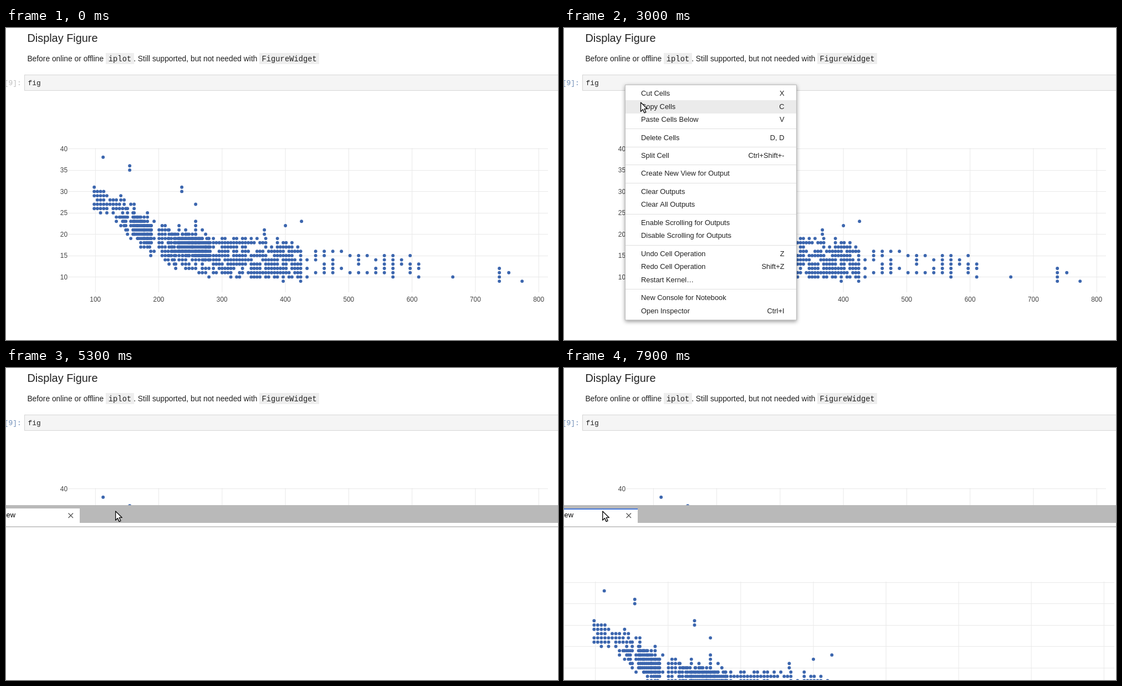
These frames come from a looping animation (996 by 562 pixels, 8000 ms). An HTML page with a canvas:

```html
<!DOCTYPE html>
<html lang="en">
<head>
<meta charset="utf-8">
<title>Display Figure</title>
<style>
  html, body { margin: 0; width: 100%; height: 100%; overflow: hidden; background: #fff; }
  canvas { display: block; width: 996px; height: 562px; }
</style>
</head>
<body>
<canvas id="stage" width="996" height="562"></canvas>
<script>
const ctx = document.getElementById('stage').getContext('2d');
const LOOP = 8000;
const SANS = '"Liberation Sans", Arial, sans-serif';
const MONO = '"Liberation Mono", monospace';
const INK = '#212121';

// ---------- drawing helpers ----------
function rect(x, y, w, h, color) {
  ctx.fillStyle = color;
  ctx.fillRect(x, y, w, h);
}
function text(str, x, y, size, color = INK, family = SANS, align = 'left') {
  ctx.font = `${size}px ${family}`;
  ctx.textAlign = align;
  ctx.fillStyle = color;
  ctx.fillText(str, x, y);
}

// ---------- scatter data, x in pixels of the main chart ----------
let seed = 11;
const random = () => (seed = (seed * 16807) % 2147483647) / 2147483647;
const trend = x => 12.5 + 16 / (1 + ((x - 150) / 100) ** 2);
const dots = [];

function column(x, low, high = low, keep = 1) {
  for (let v = Math.round(low); v <= Math.round(high); v++)
    if (random() < keep) dots.push([x, v]);
}
// Columns of dots that spread around the trend, each of a random height
function cloud({ from, to, step, spread, keep = 1, lift = 0 }) {
  const reach = () => spread * (.6 + .4 * random());
  for (let x = from; x <= to; x += step) {
    const middle = trend(x) + lift;
    column(x, middle - reach(), middle + reach(), keep);
  }
}
cloud({ from: 159, to: 216, step: 5.7, spread: 3.2, keep: .75 });
cloud({ from: 229, to: 262, step: 3, spread: 2.6 });
cloud({ from: 207, to: 268, step: 6, spread: 5, keep: .6 });
cloud({ from: 276, to: 306, step: 5.5, spread: 4.5, keep: .8 });
cloud({ from: 310, to: 368, step: 2.9, spread: 2.4, lift: 1 });
cloud({ from: 294, to: 366, step: 6, spread: 5.5, keep: .7 });
cloud({ from: 374, to: 532, step: 5.25, spread: 5, keep: .75 });
cloud({ from: 543, to: 754, step: 15.5, spread: 3, keep: .5 });

// Lone dots
column(175, 38);
column(223, 35, 36);
column(317, 30, 31);
column(342, 20, 23);
column(342, 27);
column(466, 20, 21);
column(504, 22);
column(533, 23);
column(806, 10);
column(890, 9, 12);
column(907, 11);
column(931, 9);

const valueY = (v, y0) => y0 + (40 - v) * 7.7;

// x0: position of 100, y0: position of 40, dx: width of 100 units
function chart({ x0, y0, dx, left, right, bottom }) {
  for (let v = 40; v >= 10; v -= 5)
    rect(left, Math.round(valueY(v, y0)), right - left, 1, '#e9e9e9');
  for (let i = 0; i < 8; i++)
    rect(x0 + i * dx, y0 - 1, 1, bottom - y0, '#e9e9e9');
  ctx.fillStyle = '#3c66ae';
  for (const [x, v] of dots) {
    ctx.beginPath();
    ctx.arc(x0 + .4 + (x - 161) * dx / 114.28, valueY(v, y0) + .4, 2.95, 0, 7);
    ctx.fill();
  }
}

const mainChart = { x0: 160.8, y0: 217, dx: 114.28, left: 112, right: 978, bottom: 477 };
const viewChart = { x0: 56.2, y0: 385.6, dx: 131.08, left: 1, right: 993, bottom: 640 };

function notebook(active) {
  text('Display Figure', 38.4, 25.3, 19.9);
  rect(180, 45, 51, 20, '#eee');
  rect(457, 45, 108, 20, '#eee');
  text('Before online or offline', 38.4, 60, 13.8);
  text('iplot', 184.8, 60, 13.8, INK, MONO);
  text('. Still supported, but not needed with', 230.2, 60, 13.8);
  text('FigureWidget', 461.5, 60, 13.8, INK, MONO);

  rect(33, 84, 970, 29, '#d5d5d5');
  rect(34, 85, 970, 27, '#f5f5f5');
  text('[9]:', -3.2, 103, 12.86, active ? '#6d8db8' : '#bdbdbd', MONO);
  text('fig', 39.5, 103, 12.86, INK, MONO);

  chart(mainChart);
  for (let v = 40; v >= 10; v -= 5)
    text(v, 111, valueY(v, 221.5), 11.87, '#444', SANS, 'right');
  for (let i = 0; i < 8; i++)
    text(100 + i * 100, 161.2 + i * mainChart.dx, 493.4, 11.87, '#444', SANS, 'center');
}

// ---------- context menu ----------
const menuGroups = [
  [['Cut Cells', 'X'], ['Copy Cells', 'C'], ['Paste Cells Below', 'V']],
  [['Delete Cells', 'D, D']],
  [['Split Cell', 'Ctrl+Shift+-']],
  [['Create New View for Output']],
  [['Clear Outputs'], ['Clear All Outputs']],
  [['Enable Scrolling for Outputs'], ['Disable Scrolling for Outputs']],
  [['Undo Cell Operation', 'Z'], ['Redo Cell Operation', 'Shift+Z'], ['Restart Kernel…']],
  [['New Console for Notebook'], ['Open Inspector', 'Ctrl+I']]
];

function menu(pointerY) {
  ctx.save();
  ctx.shadowColor = 'rgba(0,0,0,.4)';
  ctx.shadowBlur = 7;
  ctx.shadowOffsetY = 2;
  rect(110, 102, 310, 424.5, '#bdbdbd');
  ctx.restore();
  rect(111, 103, 308, 422.5, '#fff');
  let y = 117.8;
  menuGroups.forEach((group, i) => {
    if (i) rect(111, Math.round(y - 16), 308, 1, '#e0e0e0');
    for (const [label, keys = ''] of group) {
      if (Math.abs(pointerY - y) < 11.8) rect(111, Math.round(y - 11.5), 308, 24, '#ebebeb');
      const base = Math.round(y + 4.2);
      text(label, 139, base, 12.86);
      text(keys, 397.5, base, 12.86, INK, SANS, 'right');
      y += 23.58;
    }
    y += 8.84;
  });
}

// ---------- output view panel ----------
function panel(loaded) {
  rect(0, 247, 996, 315, '#fff');
  rect(0, 247, 996, 32, '#b9b9b9');
  rect(0, 253, 133, 26, '#fff');
  if (loaded) rect(0, 253, 133, 2, '#4878d8');
  text('ew', 0.5, 269, 12.86, '#000');
  ctx.strokeStyle = '#555';
  ctx.lineWidth = 1.3;
  ctx.stroke(new Path2D('M112.5 261.5l8.5 8.5M121 261.5l-8.5 8.5'));
  rect(0, 285, 996, 2, '#cacaca');
  if (loaded) chart(viewChart);
}

// ---------- pointer ----------
const beam = new Path2D('M-4-8h3l1 1 1-1h3M0-7V7M-4 8h3l1-1 1 1h3');
const arrow = new Path2D('M.7.9V17.2L4.5 13.6 7.2 19.6 10 18.3 7.3 12.4H12.4Z');

// Each move follows a curve from one point to the next, bent towards the middle one
const moves = [
  { start: 800, end: 1100, path: [[180, 20], [56, 80], [112, 103]] },
  { start: 2800, end: 3400, path: [[109, 100], [152, 138], [196, 247]] },
  { start: 4000, end: 4300, path: [[196, 247], [196, 252], [197, 257]] },
  { start: 7300, end: 7400, path: [[197, 257], [195, 257], [192, 257]] },
  { start: 7500, end: 7900, path: [[192, 257], [130, 257], [69, 257]] }
];

function pointerAt(t) {
  const now = Math.floor(t / 100) * 100;
  const { start, end, path: [a, b, c] } =
    moves.filter((m, i) => m.start <= now || (i === 1 && now >= 2500)).pop();
  const p = Math.min(1, Math.max(0, (now - start) / (end - start)));
  const q = 1 - p;
  return [0, 1].map(k => q * q * a[k] + 2 * q * p * b[k] + p * p * c[k]);
}

function pointer([x, y], isBeam) {
  ctx.save();
  ctx.translate(x, y);
  ctx.lineJoin = 'round';
  if (isBeam) {
    ctx.strokeStyle = '#fff';
    ctx.lineWidth = 3;
    ctx.stroke(beam);
    ctx.strokeStyle = '#000';
    ctx.lineWidth = 1.6;
    ctx.stroke(beam);
  } else {
    ctx.fillStyle = '#fff';
    ctx.fill(arrow);
    ctx.strokeStyle = '#111';
    ctx.lineWidth = 1.4;
    ctx.stroke(arrow);
  }
  ctx.restore();
}

function draw(t) {
  rect(0, 0, 996, 562, '#fff');
  notebook(t >= 2500);
  if (t < 800) return;
  const position = pointerAt(t);
  if (t >= 5300) panel(t >= 5500);
  else if (t >= 2500) menu(position[1]);
  pointer(position, t < 2500);
}

const start = performance.now();
function tick() {
  draw((performance.now() - start) % LOOP);
  requestAnimationFrame(tick);
}
tick();
</script>
</body>
</html>
```
